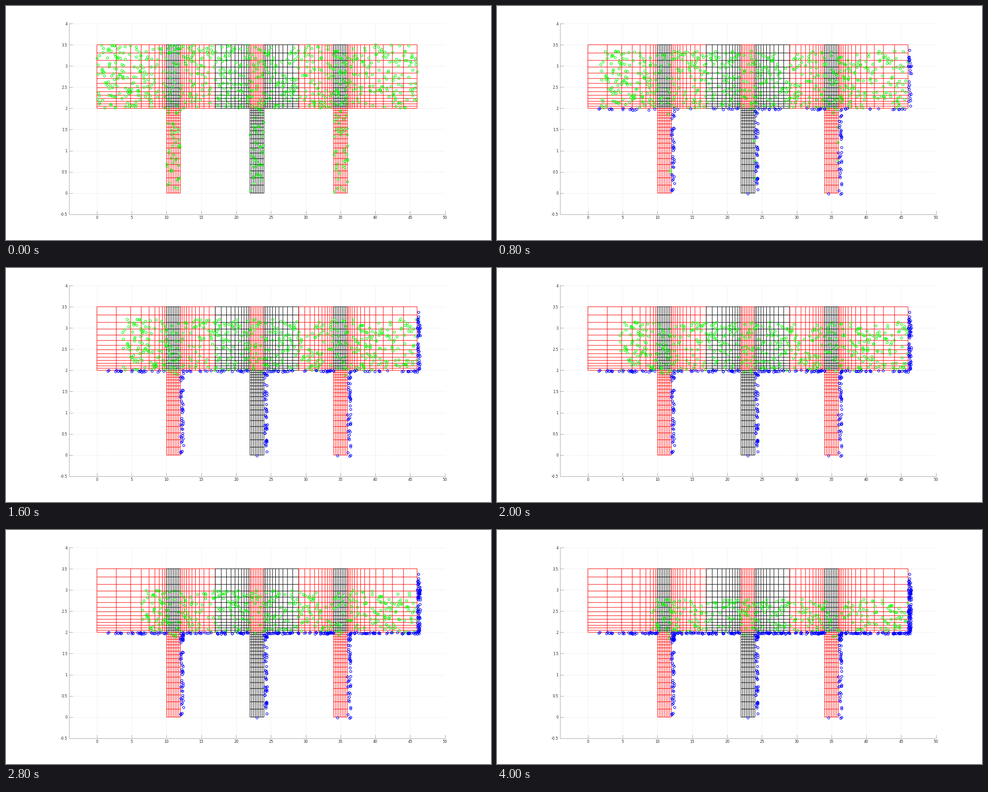
Write a matplotlib script that moves like this. It is 1077 px wide and 520 px high and loops after 4200 ms.

```python
import numpy as np
import matplotlib.pyplot as plt
from matplotlib.animation import FuncAnimation
from matplotlib.collections import LineCollection

W, H, DPI = 1077, 520, 64
FRAMES, INTERVAL = 21, 200
STEP = np.array([0.4575, -0.0357])
DENSITY = 10.6
TOP = (0, 46, 2, 3.5)
LEGS = [(x, x + 2, 0, 2) for x in (10, 22, 34)]
RED, BLACK = (1, 0, 0), (0, 0, 0)
INK, AXIS = "#262626", "#a4a4a4"


def px(n):
    return n * 72 / DPI


def graded(a, b, n, ratio=1.0):
    """Cell edges from a to b, each cell `ratio` times the one before."""
    edges = np.concatenate([[0], np.cumsum(ratio ** np.arange(n))])
    return a + (b - a) * edges / edges[-1]


def mesh(ax, xs, ys, color):
    segs = [[(x, ys[0]), (x, ys[-1])] for x in xs]
    segs += [[(xs[0], y), (xs[-1], y)] for y in ys]
    ax.add_collection(LineCollection(segs, colors=[color], linewidths=px(1.05),
                                     snap=False, zorder=2))


def draw_axes(ax):
    xs, ys = np.arange(0, 51, 5), np.arange(-0.5, 4.1, 0.5)
    ax.set(xlim=(-4, 50), ylim=(-0.5, 4))
    ax.set_xticks(xs, [f"{v:g}" for v in xs])
    ax.set_yticks(ys, [f"{v:g}" for v in ys])
    ax.spines[["top", "right"]].set_visible(False)
    ax.spines[["left", "bottom"]].set(linewidth=px(1), color=AXIS)
    ax.tick_params(direction="in", length=px(8), width=px(1), color=AXIS,
                   labelcolor=INK, labelsize=px(8), pad=px(3.5))
    ax.grid(color=INK, alpha=0.14, linewidth=px(0.6), linestyle=(0, (3, 1)))
    ax.set_axisbelow(True)


def deck_columns():
    """Column edges of the deck: cells shrink towards each leg."""
    yield graded(0, 10, 9, 0.74)
    for a, b, *_ in LEGS:
        yield graded(a, b, 8)
        if b < 36:
            yield graded(b, b + 5, 10, 1.15)
            yield graded(b + 5, b + 10, 10, 1 / 1.15)
    yield graded(36, 46, 13, 1 / 0.82)


def draw_meshes(ax):
    rows = graded(3.5, 2, 14, 0.9)
    for i, cols in enumerate(deck_columns()):
        mesh(ax, cols, rows, BLACK if i % 2 else RED)
    for i, (a, b, lo, hi) in enumerate(LEGS):
        mesh(ax, graded(a, b, 8), graded(lo, hi, 19, 0.93), BLACK if i % 2 else RED)


def inside(p):
    x, y = p.T
    hit = np.zeros(len(p), bool)
    for a, b, lo, hi in [TOP] + LEGS:
        hit |= (x >= a) & (x <= b) & (y >= lo) & (y <= hi)
    return hit


def scatter(rng, box):
    a, b, lo, hi = box
    n = round(DENSITY * (b - a) * (hi - lo))
    return rng.uniform((a, lo), (b, hi), (n, 2))


def drift(pos):
    """Positions and live flags per step; particles stop once they leave."""
    live = np.ones(len(pos), bool)
    states = [(pos, live)]
    for _ in range(FRAMES - 1):
        pos = pos + STEP * live[:, None]
        live = live & inside(pos)
        states.append((pos, live))
    return states


fig = plt.figure(figsize=(W / DPI, H / DPI), dpi=DPI, facecolor="white")
plt.rcParams["font.family"] = "DejaVu Sans"
ax = fig.add_axes([0.13, 0.11, 0.775, 0.815])
draw_axes(ax)
draw_meshes(ax)

rng = np.random.default_rng(12)
states = drift(np.vstack([scatter(rng, box) for box in [TOP] + LEGS]))

ring = dict(linestyle="none", marker="o", markersize=px(4.9), markerfacecolor="none",
            markeredgewidth=px(1.15), clip_on=False, snap=False)
moving, = ax.plot([], [], color=(0, 1, 0), zorder=3, **ring)
stopped, = ax.plot([], [], color=(0, 0, 1), zorder=4, **ring)


def update(i):
    pos, live = states[i]
    moving.set_data(*pos[live].T)
    stopped.set_data(*pos[~live].T)
    return moving, stopped


anim = FuncAnimation(fig, update, frames=FRAMES, interval=INTERVAL, repeat=True)
plt.show()
```
